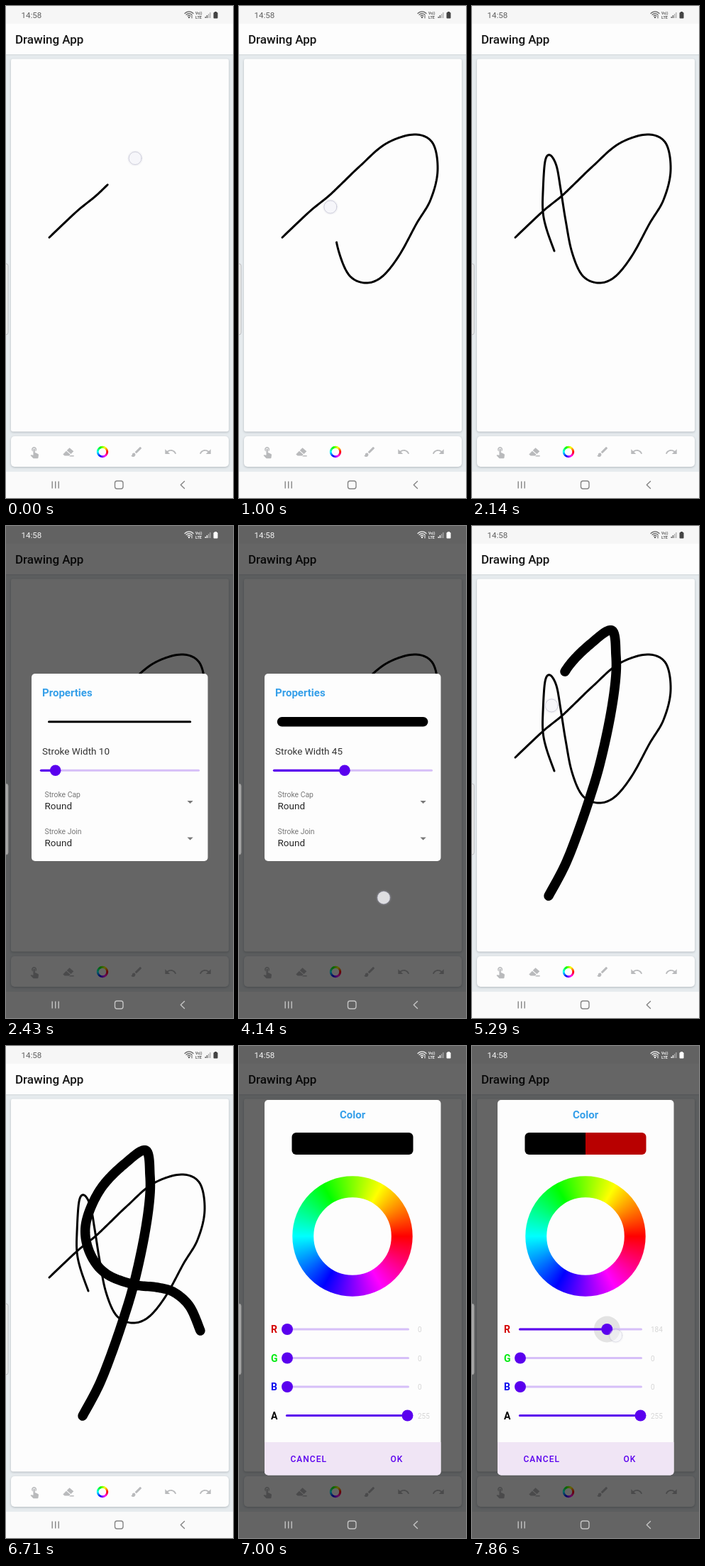
Animation, 320 px wide and 693 px high, one loop 8 s. Source, as an HTML page with a canvas:

```html
<!DOCTYPE html>
<html lang="en">
<head>
<meta charset="utf-8">
<title>Drawing App</title>
<style>
  html, body { margin: 0; width: 100%; height: 100%; overflow: hidden; background: #fdfdfd; }
  canvas { display: block; width: 320px; height: 693px; }
</style>
</head>
<body>
<canvas id="stage"></canvas>
<script>
const W = 320, H = 693, LOOP = 8000, FPS = 7;
const canvas = document.getElementById('stage');
const ratio = window.devicePixelRatio || 1;
canvas.width = W * ratio;
canvas.height = H * ratio;
const ctx = canvas.getContext('2d');
ctx.scale(ratio, ratio);

const PURPLE = '#5a00ee', PALE = '#d6bff8', BLUE = '#359fe9', PAPER = '#fdfdfd';
const clamp = v => Math.max(0, Math.min(1, v));
const span = (t, a, b) => clamp((t - a) / (b - a));
const smooth = v => v * v * (3 - 2 * v);

// Catmull-Rom curve sampled into points with running length
function curve(points) {
  const out = [];
  let len = 0;
  const at = i => points[Math.max(0, Math.min(points.length - 1, i))];
  for (let i = 0; i < points.length - 1; i++) {
    const [a, b, c, d] = [at(i - 1), at(i), at(i + 1), at(i + 2)];
    for (let s = 0; s < 12; s++) {
      const u = s / 12;
      const [x, y] = [0, 1].map(k => b[k] + 0.5 * u * (c[k] - a[k] +
        u * (2 * a[k] - 5 * b[k] + 4 * c[k] - d[k] + u * (3 * (b[k] - c[k]) + d[k] - a[k]))));
      const last = out[out.length - 1];
      if (last) len += Math.hypot(x - last.x, y - last.y);
      out.push({ x, y, len });
    }
  }
  const [x, y] = at(points.length - 1), last = out[out.length - 1];
  out.push({ x, y, len: len + Math.hypot(x - last.x, y - last.y) });
  return out;
}
const total = path => path[path.length - 1].len;
const pointAt = (path, len) => path.find(p => p.len >= len) || path[path.length - 1];

const thin = curve([[61, 326], [99, 290], [126, 268], [145, 250], [171, 225], [207, 194], [247, 181],
  [273, 193], [280, 232], [270, 273], [250, 307], [226, 351], [202, 381], [179, 390], [156, 380],
  [141, 347], [132, 302], [125, 258], [119, 225], [110, 210], [103, 219], [100, 262], [100, 290],
  [105, 314], [116, 345]]);
const thick = curve([[108, 521], [130, 480], [147, 438], [165, 386], [180, 336], [194, 273],
  [202, 220], [203, 183], [197, 147], [166, 167], [135, 199], [116, 237], [112, 268], [122, 299],
  [143, 322], [180, 336], [213, 340], [237, 347], [259, 367], [274, 401]]);

function box(x, y, w, h, r, fill) {
  ctx.beginPath();
  ctx.roundRect(x, y, w, h, r);
  if (fill) { ctx.fillStyle = fill; ctx.fill(); }
}
function disc(x, y, r, fill) {
  ctx.beginPath();
  ctx.arc(x, y, r, 0, 7);
  ctx.fillStyle = fill;
  ctx.fill();
}
function line(points, width, color, cap = 'round') {
  ctx.beginPath();
  points.forEach(([x, y]) => ctx.lineTo(x, y));
  ctx.lineWidth = width;
  ctx.strokeStyle = color;
  ctx.lineCap = cap;
  ctx.lineJoin = 'round';
  ctx.stroke();
}
function text(str, x, y, size, color, weight = 400, align = 'left', spacing = 0) {
  ctx.font = `${weight} ${size}px Roboto, sans-serif`;
  ctx.letterSpacing = spacing + 'px';
  ctx.textAlign = align;
  ctx.fillStyle = color;
  ctx.fillText(str, x, y);
}
function card(x, y, w, h, r) {
  ctx.save();
  ctx.shadowColor = 'rgba(60,70,80,.3)';
  ctx.shadowBlur = 3 * ratio;
  ctx.shadowOffsetY = ratio;
  box(x, y, w, h, r, PAPER);
  ctx.restore();
}
function ring(x, y, outer, inner) {
  const g = ctx.createConicGradient(0, x, y);
  for (let i = 0; i <= 6; i++) g.addColorStop(i / 6, `hsl(${360 - i * 60},100%,50%)`);
  ctx.beginPath();
  ctx.arc(x, y, (outer + inner) / 2, 0, 7);
  ctx.lineWidth = outer - inner;
  ctx.strokeStyle = g;
  ctx.stroke();
}
function slider(x0, x1, y, x, r) {
  line([[x0, y], [x1, y]], 3, PALE);
  line([[x0, y], [x, y]], 3.2, PURPLE);
  disc(x, y, r, PURPLE);
}
function touch(x, y) {
  disc(x, y, 11, 'rgba(190,190,205,.12)');
  disc(x, y, 9, 'rgba(246,246,250,.82)');
  ctx.strokeStyle = 'rgba(165,165,190,.5)';
  ctx.lineWidth = 1;
  ctx.stroke();
}
function drawStroke(path, len, width) {
  const pts = path.filter(p => p.len <= len).map(p => [p.x, p.y]);
  if (pts.length > 1) line(pts, width, '#000');
}

const UNDO = new Path2D('M12.5 8c-2.65 0-5.05 1-6.9 2.6L2 7v9h9l-3.6-3.6c1.4-1.2 3.1-1.9 5.1-1.9 3.5 0 6.5 2.3 7.6 5.5l2.4-.8C21 11 17.1 8 12.5 8z');
const BRUSH = new Path2D('M7 14a3 3 0 0 0-3 3c0 1.3-1.2 2-2 2 .9 1.2 2.5 2 4 2a4 4 0 0 0 4-4 3 3 0 0 0-3-3zM20.7 4.6l-1.3-1.3a1 1 0 0 0-1.4 0L9 12.2 11.8 15l9-9a1 1 0 0 0-.1-1.4z');
const HAND = new Path2D('M9 11.2V7.5a2.5 2.5 0 0 1 5 0v3.7a4.5 4.5 0 1 0-5 0zM18.8 15.9l-4.5-2.3-1.3-.1v-6a1.5 1.5 0 0 0-3 0v10.7l-3.7-.7-1.5 1.1 5 5q.4.4 1 .4h6.8q1.3 0 1.5-1.3l.7-5.3q0-1-1-1.5z');
const ERASER = new Path2D('M14 4.5L21.5 11 16.5 16 9 9.5zM8 10.5L15.5 17 13.5 19H5L2 16.5zM15.5 18.5h6.5v2h-8.5z');

function icon(path, x, y, flip = 1) {
  ctx.save();
  ctx.translate(x, y);
  ctx.scale(0.77 * flip, 0.77);
  ctx.translate(-12, -12);
  ctx.fillStyle = '#b9babc';
  ctx.fill(path);
  ctx.restore();
}

function app(thinLen, thickLen) {
  box(0, 0, W, H, 0, '#e6ebee');
  box(0, 0, W, 68, 0, PAPER);
  box(0, 0, W, 25, 0, '#f6f6f6');
  box(0, 68, W, 1.5, 0, '#d9dee1');
  text('Drawing App', 13, 53, 17, '#151515', 500);
  card(7, 74.5, 307, 525, 3);
  drawStroke(thin, thinLen, 3);
  drawStroke(thick, thickLen, 13.5);
  card(7, 606, 307, 43, 5);
  icon(HAND, 40, 628);
  icon(ERASER, 88, 628);
  ring(136, 628, 8.2, 5.3);
  icon(BRUSH, 184, 628);
  icon(UNDO, 232, 628);
  icon(UNDO, 281, 628, -1);
  box(0, 656, W, 37, 0, '#fafafa');
}

function system(dark) {
  const c = dark ? '#f4f4f4' : '#606060', nav = dark ? '#c4c4c4' : '#858585';
  text('14:58', 21.5, 17, 11.5, c);
  for (let i = 1; i < 4; i++) {
    ctx.beginPath();
    ctx.arc(258, 16, i * 2.7, -2.4, -0.74);
    ctx.lineWidth = 1.2;
    ctx.strokeStyle = c;
    ctx.stroke();
  }
  disc(258, 16, 1.2, c);
  line([[262, 13.5], [262, 17]], 1, c);
  text('Vo))', 267, 12, 5, c, 700);
  text('LTE', 267, 17.5, 5.5, c, 700);
  for (let i = 0; i < 4; i++) {
    ctx.globalAlpha = i < 2 ? 1 : 0.45;
    box(280.5 + i * 2.2, 15 - i * 2, 1.4, 2 + i * 2, 0, c);
  }
  ctx.globalAlpha = 1;
  const cell = dark ? '#fff' : '#444';
  box(292.5, 9, 6, 8.5, 1, cell);
  box(294, 8, 3, 1.5, 0, cell);

  [65.2, 69.7, 74.2].forEach(x => line([[x, 669.5], [x, 679.5]], 1.4, nav, 'butt'));
  box(153.5, 669, 11.5, 11, 3);
  ctx.lineWidth = 1.4;
  ctx.strokeStyle = nav;
  ctx.stroke();
  line([[251.5, 669.5], [246.3, 674.5], [251.5, 679.5]], 1.4, nav);
  box(-4, 363, 7, 100, 3, dark ? '#a9a9a9' : '#ececec');
  ctx.lineWidth = 1;
  ctx.strokeStyle = dark ? '#8c8c8c' : '#bdbfc1';
  ctx.stroke();
}

const widthX = v => 49.3 + (v - 1) * 2.265;
const channelX = v => 68 + v / 255 * 169.5;

function select(label, y) {
  text(label, 54.5, y, 10.4, '#777');
  text('Round', 54.5, y + 17, 13.5, '#262626');
  ctx.beginPath();
  ctx.moveTo(255.5, y + 5);
  ctx.lineTo(263.7, y + 5);
  ctx.lineTo(259.6, y + 9);
  ctx.fillStyle = '#777';
  ctx.fill();
}
function properties(value, pressed) {
  box(36, 208, 248.5, 264, 5, PAPER);
  text('Properties', 51, 240, 15, BLUE, 700);
  line([[60.5, 275.8], [259.7, 275.8]], value * 0.3, '#000');
  text('Stroke Width ' + value, 51, 322, 13.5, '#333');
  const x = widthX(value);
  if (pressed) disc(x, 344, 18, 'rgba(90,0,238,.12)');
  slider(49.5, 271.5, 344.3, x, 7.8);
  select('Stroke Cap', 382);
  select('Stroke Join', 433.5);
}
function colorDialog(red, pressed) {
  ctx.save();
  box(36, 76, 248.5, 528.5, 5, PAPER);
  ctx.clip();
  box(36, 558, 249, 47, 0, '#f0e5f5');
  ctx.restore();
  text('Color', 160, 101.5, 15, BLUE, 700, 'center');
  box(74.5, 122, 85.5, 31, [6, 0, 0, 6], '#000');
  box(160, 122, 85.5, 31, [0, 6, 6, 0], `rgb(${red},0,0)`);
  ring(160, 268, 84.7, 54.8);
  if (pressed) disc(channelX(red), 399, 18.5, 'rgba(60,60,60,.13)');
  [['R', '#d40000', red], ['G', '#00ea10', 0], ['B', '#0a0aee', 0], ['A', '#000', 255]]
    .forEach(([name, color, v], i) => {
      const y = 399 + i * 40.5;
      text(name, 45, y + 5, 14, color, 700);
      slider(67.5, 238.5, y, channelX(v), 8);
      text(v, 252, y + 4, 10, '#d6d6d6');
    });
  text('CANCEL', 72.5, 586, 12, PURPLE, 500, 'left', 1);
  text('OK', 213.5, 586, 12, PURPLE, 500, 'left', 1);
}

function render(time) {
  const t = Math.floor((time + 5) * FPS / 1000) / FPS;
  const thinLen = 113 + span(t, 0, 1.57) * (total(thin) - 113);
  const thickLen = span(t, 4.6, 5.7) * total(thick);
  const width = Math.round(10 + 35 * smooth(span(t, 3.1, 3.85)));
  const red = Math.round(184 * span(t, 7.42, 7.85));
  const propsIn = span(t, 2.15, 2.42) * (1 - span(t, 4.15, 4.42));
  const colorIn = span(t, 6.72, 6.99);
  const dim = Math.max(propsIn, colorIn);

  app(thinLen, thickLen);
  if (t < 1.65) {
    const p = pointAt(thin, thinLen + 48);
    touch(p.x, p.y);
  }
  if (t > 4.65 && t < 5.7) {
    const p = pointAt(thick, thickLen + 48);
    touch(p.x, p.y);
  }
  box(0, 0, W, H, 0, `rgba(0,0,0,${0.6 * dim})`);
  system(dim > 0.4);

  const dragWidth = t > 3.1 && t < 3.8, dragRed = t > 7.4;
  ctx.globalAlpha = propsIn;
  if (propsIn) properties(width, dragWidth);
  ctx.globalAlpha = colorIn;
  if (colorIn) colorDialog(red, dragRed);
  ctx.globalAlpha = 1;
  if (dragWidth) touch(widthX(width) + 6, 350);
  if (t > 4.1 && t < 4.2) touch(204, 523.5);
  if (dragRed) {
    ctx.globalAlpha = 0.6;
    touch(channelX(red) + 12.5, 408);
    ctx.globalAlpha = 1;
  }
}

const start = performance.now();
function tick() {
  render((performance.now() - start) % LOOP);
  requestAnimationFrame(tick);
}
tick();
</script>
</body>
</html>
```
